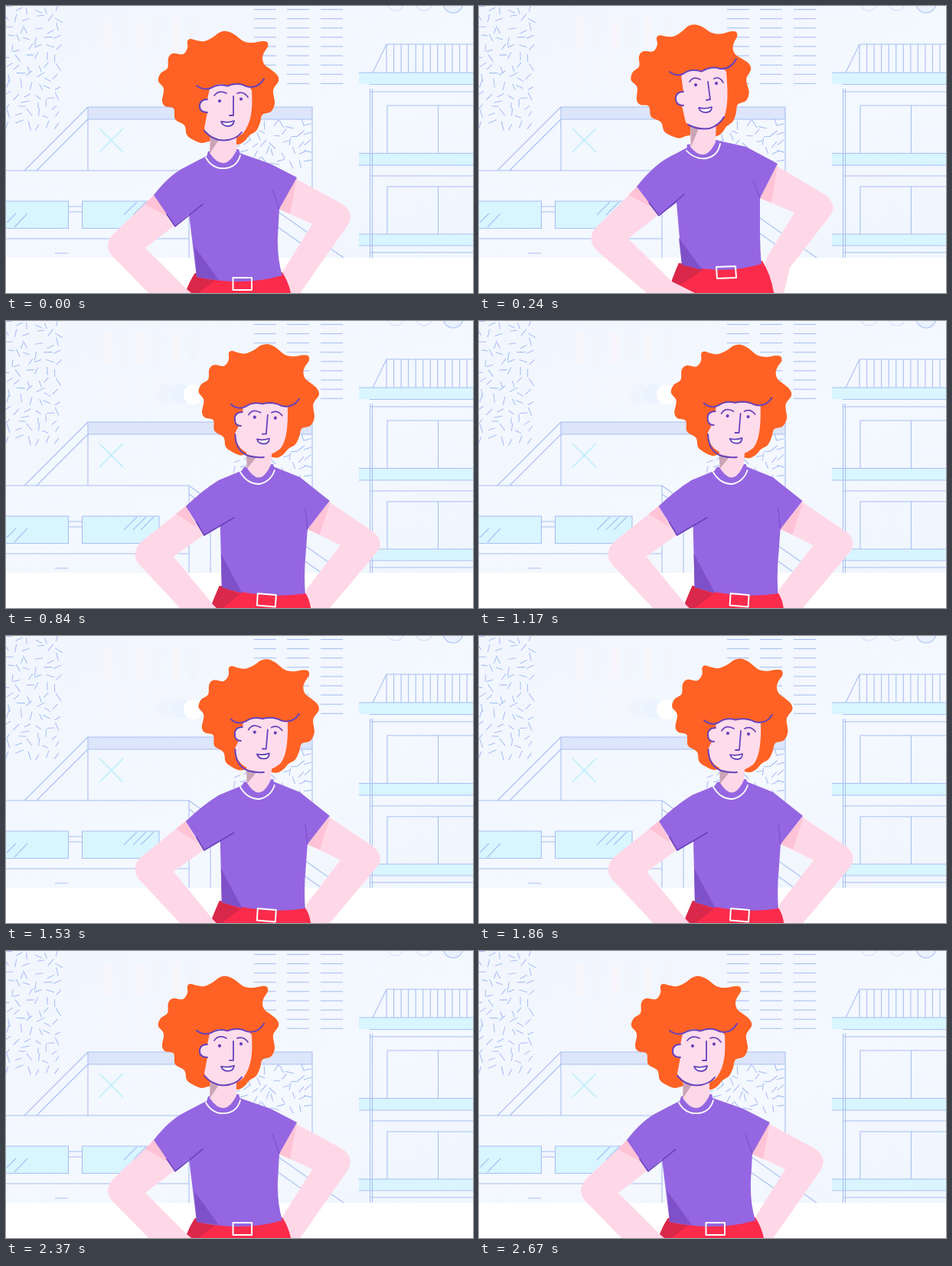
These frames come from a looping animation (610x375 px, 2700 ms). An HTML page:

```html
<!DOCTYPE html>
<html lang="en">
<head>
<meta charset="utf-8">
<title>Standing figure</title>
<style>
html, body { margin: 0; width: 100%; height: 100%; overflow: hidden; background: #fff; }
svg { display: block; width: 100vw; height: 100vh; }
</style>
</head>
<body>
<svg id="stage" viewBox="0 0 610 375">
  <defs>
    <linearGradient id="sky" x2="1" y2="1">
      <stop offset="0" stop-color="#f1f6fe"/><stop offset=".6" stop-color="#f4f8ff"/><stop offset="1" stop-color="#f0f6fe"/>
    </linearGradient>
  </defs>
  <rect width="610" height="329" fill="url(#sky)"/>
  <g id="scene" fill="none" stroke="#a9c0f2" stroke-width="1.1"></g>
  <g id="figure" fill="none" stroke-linecap="round" stroke-linejoin="round"></g>
</svg>
<script>
const NS = 'http://www.w3.org/2000/svg';
const scene = document.getElementById('scene');
const figure = document.getElementById('figure');

function add(parent, tag, attrs) {
  const el = document.createElementNS(NS, tag);
  for (const k in attrs) el.setAttribute(k, attrs[k]);
  return parent.appendChild(el);
}
const line = (d, attrs) => add(scene, 'path', { d, ...attrs });
const box = (x, y, width, height, fill) => add(scene, 'rect', { x, y, width, height, fill, stroke: 'none' });
const dot = (cx, cy, r, attrs) => add(scene, 'circle', { cx, cy, r, ...attrs });

let seed = 11;
function rand() {
  seed = (seed * 16807) % 2147483647;
  return seed / 2147483647;
}

// Scattered short strokes on a jittered grid
function dashes(x0, y0, x1, y1, step) {
  let d = '';
  for (let y = y0; y < y1; y += step)
    for (let x = x0; x < x1; x += step) {
      const a = rand() * Math.PI, len = 4 + rand() * 2;
      const cx = Math.min(x1 - 5, x + rand() * step * .7), cy = y + rand() * step * .7;
      const dx = Math.cos(a) * len, dy = Math.sin(a) * len;
      d += `M${cx - dx} ${cy - dy}L${cx + dx} ${cy + dy}`;
    }
  line(d);
}

function drawScene() {
  const cyan = '#d9f5ff';
  // Back wall
  dashes(0, 0, 74, 154, 12.5);
  for (let i = 0; i < 6; i++) {
    box(126 + i * 22.5, 15, 11, 42, i % 2 ? '#f2f5fc' : '#f5f5fa');
    if (i < 4) box(126 + i * 22.5, 71, 11, 38, '#f4f6fc');
  }
  for (const x of [324, 367, 411])
    for (let i = 0; i < 9; i++) line(`M${x} ${4.5 + i * 12.1}h29`);
  dot(210, 95, 13, { fill: '#eff5fe', stroke: 'none' });
  dot(228, 95, 13, { fill: '#ebf4fe', stroke: 'none' });
  dot(245, 96, 13, { fill: '#fff', stroke: 'none' });
  dot(509, -5, 11, { stroke: '#d2e0fa' });
  dot(546, -5, 11, { stroke: '#d2e0fa' });
  dot(584, -4, 13, { fill: '#eaf1fd' });

  // Stall and van
  box(107, 132, 293, 16, '#dde5fb');
  line('M107 132H400V250M107 132V215M107 148H400M24 215L107 132M40 215L107 148');
  dashes(298, 152, 399, 206, 12);
  line('M122 160L153 191M153 160L122 191', { stroke: '#b5eefa', 'stroke-width': 1.4 });
  line('M0 215H239V329M0 304H239M64 323H81M239 215L275 241M239 226L262 243M267 245V329');
  box(0, 255, 82, 36, cyan);
  box(99, 255, 101, 36, cyan);
  line('M0 255H81.500V290.500H0M99.500 255H200V290.500H99.500ZM82 262H99M82 269H99');
  line('M1 283L13 271M11 289L28 271M154 273L171 256M166 273L183 256M176 273L193 256');
  line('M300 230L441 329M300 250L412 329');

  // Balconies
  let rails = 'M610 50H497L479 87';
  for (let x = 497; x < 610; x += 9.55) rails += `M${x} 50V87`;
  line(rails);
  box(461, 87, 149, 15, cyan);
  box(461, 192, 149, 16, cyan);
  box(461, 298, 149, 14, cyan);
  line('M461 87H610M475 102.500H610M475 112H610M461 192.500H610M461 208H610M475 222H610M461 298H610M461 313H610M475 322H610');
  line('M475.500 108V329M478.500 108V329M498 192V130H610M564.500 130V192M498 298V236H610M564.500 236V298');
}

// Smooth closed curve through points
function blob(p) {
  const n = p.length, at = i => p[(i + n) % n];
  let d = 'M' + p[0];
  for (let i = 0; i < n; i++) {
    const [a, b, c, e] = [at(i - 1), at(i), at(i + 1), at(i + 2)];
    d += `C${b[0] + (c[0] - a[0]) / 6} ${b[1] + (c[1] - a[1]) / 6} ${c[0] - (e[0] - b[0]) / 6} ${c[1] - (e[1] - b[1]) / 6} ${c}`;
  }
  return d + 'Z';
}

// Value at s for a curve through left (0), rise (.4) and right (1)
const blend = (a, b, c, s) => {
  const k = (a + (c - a) * .4 - b) / .24;
  return a + (c - a) * s - k * s * (1 - s);
};

const parts = [];
// Three poses of one path: left, rise, right; lift is the small upward nod at rest
function part(attrs, left, rise, right, lift = 0) {
  const nums = [left, rise, right].map(d => d.match(/-?\d+(\.\d+)?/g).map(Number));
  parts.push({ el: add(figure, 'path', attrs), cmds: left.split(/-?\d+(?:\.\d+)?/), nums, lift });
}
const ink = w => ({ stroke: '#6741bb', 'stroke-width': w });
const SKIN = { fill: '#ffd8e8' }, SHADE = { fill: '#ffc3d5' }, SHIRT = { fill: '#9566e1' };

const hair = add(figure, 'path', {
  fill: '#ff6224',
  d: blob([
    [237, 46], [241, 43], [249, 45], [259, 46], [270, 41], [279, 34.5], [288, 33], [298, 37],
    [310, 46], [322, 48], [334, 46], [341, 47], [342, 53], [337, 61], [335, 69], [338, 77],
    [346, 83], [354, 90], [356, 98], [349, 110], [351, 127], [346, 138], [335, 142],
    [332, 152], [327, 163], [318, 169], [311, 177], [301, 181], [282, 176], [265, 177],
    [255, 179], [243, 174], [236, 168], [233, 156], [221, 148], [219, 134], [208, 131],
    [204, 124], [206, 108], [199, 98], [202, 88], [211, 81], [212, 68], [218, 62],
    [231, 63], [237, 55]
  ])
});

function drawFigure() {
  // Right arm
  part(SKIN,
    'M372 222L440 259Q456 271 446 287L413 334L381 380L352 380L362 346L400 285L350 262Z',
    'M382 205L453 247Q469 261 458 275L406 342L397 380L366 380L375 330L412 270L360 248Z',
    'M416 232L481 276Q495 289 484 303L452 341L419 380L385 380L393 350L437 293L388 269Z');
  part(SHADE,
    'M380 224L371 272L356 265Z',
    'M390 207L382 257L366 251Z',
    'M424 236L410 279L393 272Z');
  // Trousers
  part({ fill: '#fb2b4b' },
    'M247 349L300 354L361 348Q370 362 373 380L233 380Q238 362 247 349Z',
    'M261 336L315 339L370 333Q382 352 386 380L246 380Q252 356 261 336Z',
    'M279 346L332 350L390 354Q397 362 399 380L265 380Q272 362 279 346Z');
  part({ fill: '#d9284a' },
    'M247 349L274 358L244 380L233 380Q238 362 247 349Z',
    'M261 336L292 345L264 364L250 364Q254 352 261 336Z',
    'M279 346L306 357L276 380L265 380Q272 362 279 346Z');
  // Left arm
  part(SKIN,
    'M198 243L140 298Q126 313 140 328L191 380L248 380L236 370L182 316L224 284Z',
    'M211 232L153 289Q140 304 153 319L225 380L292 380L252 360L195 304L238 270Z',
    'M240 238L175 290Q163 305 174 318L232 380L280 380L271 371L219 308L262 277Z');
  part(SHADE,
    'M194 246L181 259L213 276Z',
    'M206 236L195 247L226 263Z',
    'M235 242L222 252L250 270Z');
  // Shirt
  part(SHIRT,
    'M262 196Q284 206 302 191L345 206L380 224L357 265L355 300Q354 330 361 352Q310 367 249 354L239 272L221 288L193 247Q213 221 233 211Z',
    'M270 186Q292 195 313 176L349 184L390 206L367 251L367 290Q367 320 369 337Q320 352 265 338L258 257L235 274L206 236Q228 208 249 197Z',
    'M307 196Q332 201 349 190L384 204L423 235L394 272L392 300Q389 330 391 356Q340 364 282 348L280 268L259 280L235 242Q257 221 278 208Z');
  part({ fill: '#7f51c8' },
    'M246 314L278 358L249 354Z',
    'M261 303L292 345L265 338Z',
    'M281 304L309 356L282 348Z');
  part(ink(1.5),
    'M210 272L221 288L257 259',
    'M222 257L235 274L268 246',
    'M249 263L259 280L298 257');
  part(ink(.7),
    'M348 240L357 265',
    'M358 228L367 251',
    'M391 245L394 272');
  part({ stroke: '#fff', 'stroke-width': 2 },
    'M296.500 355L321 355L321 371L296.500 371Z',
    'M310 341L335 340L336 355L311 356Z',
    'M329 356L353 358L352 373.500L328 371.500Z');
  // Neck
  part(SHIRT,
    'M264 190L304 187L306 194Q285 211 262 197Z',
    'M272 181L312 175L315 180Q295 200 271 187Z',
    'M311 191L349 187L351 193Q331 209 307 197Z');
  part(SKIN,
    'M267 160L301 160L301 189Q285 220 266 192Z',
    'M276 146L310 146L309 178Q295 207 276 184Z',
    'M314 166L348 166L346 188Q332 219 315 192Z');
  part({ fill: '#c9a5b5' },
    'M267 171L278 175L266 193Z',
    'M276 155L287 160L277 184Z',
    'M314 174L328 177L315 193Z');
  part({ stroke: '#fff', 'stroke-width': 1.8 },
    'M261 198Q270 214 287 212Q302 210 306 195',
    'M271 189Q282 201 297 199Q312 196 315 180',
    'M306 197Q315 213 331 213Q346 210 351 195');
  // Face
  part({ fill: '#ffdcec' },
    'M266 108Q277 99 289 104Q303 99 318 106L321 110C322 130 322 150 310 166Q296 178 275 174Q262 170 259 160L263 139Q253 140 253 131Q253 122 263 122Z',
    'M264 90Q276 80 291 85Q303 78 320 82L323 86C325 110 326 130 320 146Q308 160 293 160Q276 158 270 152L265 130Q257 130 257 121Q257 112 267 112Z',
    'M310 114Q322 105 335 109Q350 106 364 113L368 112C369 140 366 160 358 168Q345 178 330 178Q300 172 299 148L304 138Q299 138 299 129Q299 120 309 120Z', .5);
  part(ink(2),
    'M259 163Q270 176 285 175.500Q300 175 308 165',
    'M273 155Q286 162 301 160Q314 156 320 145',
    'M299.500 148Q300 171 318 176.500Q328 179 337 178');
  part(ink(2),
    'M263 122Q253 122 253 131Q253 139 263 139',
    'M267 112Q257 112 257 121Q257 130 267 130',
    'M309 120Q299 120 299 129Q299 138 307 138', .7);
  part(ink(2),
    'M249 104Q258 111 268 107Q278 101 289 104.500Q303 99 314 105Q329 109 337 95',
    'M249 86Q258 93 267 88.500Q277 81 291 85.500Q303 78 315 82Q329 83 336 69',
    'M294 110Q303 118 313 113Q323 106 335 109.500Q349 106 360 112Q375 116 383 103', .9);
  part(ink(1.7),
    'M272 117Q278 109 288 114M302 114Q310 111 316 119',
    'M275 99Q280 91 289 96M307 95Q314 91 319 100',
    'M317 124Q322 115 333 121M347 121Q355 117 361 125', 1);
  part(ink(4.2),
    'M279 124L279 124.100M307 121.500L307 121.600',
    'M283 103L283 103.100M310 101L310 101.100',
    'M325 127L325 127.100M352 128L352 128.100', 1);
  part(ink(1.8),
    'M297 118L297 143L292 143',
    'M299 99L302 122L297 123',
    'M342 124L340 149L335 149', 1);
  part({ ...ink(1.8), fill: '#fff' },
    'M281 151Q290 153 298 150Q297 157 290 157Q283 157 281 151Z',
    'M287 133Q296 135 304 132Q304 138.500 297 139Q289 139.500 287 133Z',
    'M328 155Q336 157 344 154Q344 161 337 161Q330 161 328 155Z', .4);
}

const PERIOD = 2700, SHIFT = 540, TURN = 1200;

function render(t) {
  const m = Math.max(0, t <= TURN ? t : 2 * TURN - t);
  const u = Math.min(1, m / SHIFT);
  const s = u * u * u * (10 - 15 * u + 6 * u * u);
  const rest = m > SHIFT ? (1 - Math.cos(Math.PI * (m - SHIFT) / (TURN - SHIFT))) / 2 : 0;

  for (const { el, cmds, nums: [a, b, c], lift } of parts) {
    let d = cmds[0];
    for (let i = 0; i < a.length; i++) d += blend(a[i], b[i], c[i], s).toFixed(2) + cmds[i + 1];
    el.setAttribute('d', d);
    el.setAttribute('transform', `translate(${-.4 * rest} ${-3 * lift * rest})`);
  }
  const x = blend(0, 0, 53, s) - 1.3 * rest, y = blend(0, -8, -3.5, s) + 1.2 * rest;
  hair.setAttribute('transform', `translate(${x} ${y}) rotate(${blend(0, -5, 1.5, s)} 277 105)`);
}

drawScene();
drawFigure();
const start = performance.now();
function tick() {
  render((performance.now() - start) % PERIOD);
  requestAnimationFrame(tick);
}
render(0);
requestAnimationFrame(tick);
</script>
</body>
</html>
```
